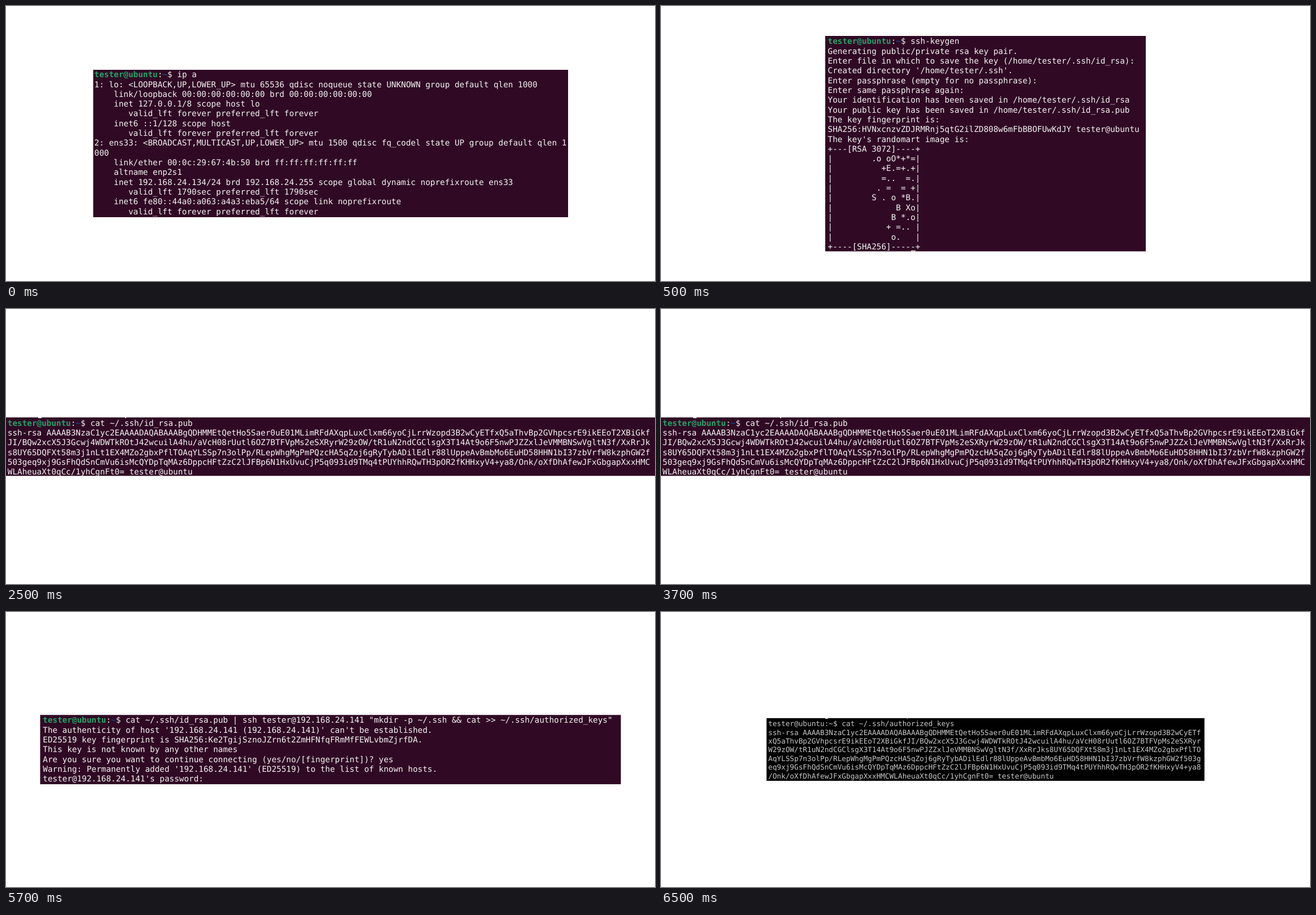
Write an HTML page that moves like this. It is 1150x487 px and loops after 8000 ms.

```html
<!DOCTYPE html>
<html lang="en">
<head>
<meta charset="utf-8">
<title>SSH key setup</title>
<style>
  html, body { margin: 0; width: 100%; height: 100%; overflow: hidden; background: #fff; }
  svg { display: block; width: 1150px; height: 487px; }
  text {
    font-family: "DejaVu Sans Mono", monospace;
    white-space: pre;
    text-rendering: geometricPrecision;
  }
  .user { fill: #26a269; font-weight: bold; }
  .path { fill: #12488b; font-weight: bold; }
</style>
</head>
<body>
<svg id="stage" viewBox="0 0 1150 487"></svg>
<script>
const HOST = 'tester@ubuntu';
const PROMPT = HOST + ':~$ ';
const FOREVER = '       valid_lft forever preferred_lft forever';

const KEY = 'ssh-rsa AAAAB3NzaC1yc2EAAAADAQABAAABgQDHMMEtQetHo5Saer0uE01MLimRFdAXqpLuxClxm66yoCjLrrWzopd3B2wCyETfxQ5aThvBp2GVhpcsrE9ikEEoT2XBiGkf' +
  'JI/BQw2xcX5J3Gcwj4WDWTkROtJ42wcuilA4hu/aVcH08rUutl6OZ7BTFVpMs2eSXRyrW29zOW/tR1uN2ndCGClsgX3T14At9o6F5nwPJZZxlJeVMMBNSwVgltN3f/XxRrJk' +
  's8UY65DQFXt58m3j1nLt1EX4MZo2gbxPflTOAqYLSSp7n3olPp/RLepWhgMgPmPQzcHA5qZoj6gRyTybADilEdlr88lUppeAvBmbMo6EuHD58HHN1bI37zbVrfW8kzphGW2f' +
  '503geq9xj9GsFhQdSnCmVu6isMcQYDpTqMAz6DppcHFtZzC2lJFBp6N1HxUvuCjP5q093id9TMq4tPUYhhRQwTH3pOR2fKHHxyV4+ya8/Onk/oXfDhAfewJFxGbgapXxxHMC' +
  'WLAheuaXt0qCc/1yhCgnFt0= ' + HOST;

const wrap = (text, cols) => text.match(new RegExp(`.{1,${cols}}`, 'g'));

// box: x, y, right, bottom; at: left edge and first baseline; marks: cut-off glyph scraps
const scenes = [
  {
    start: 0, box: [154.5, 113, 996, 374], at: [156.6, 126.2],
    lines: [
      PROMPT + 'ip a',
      '1: lo: <LOOPBACK,UP,LOWER_UP> mtu 65536 qdisc noqueue state UNKNOWN group default qlen 1000',
      '    link/loopback 00:00:00:00:00:00 brd 00:00:00:00:00:00',
      '    inet 127.0.0.1/8 scope host lo',
      FOREVER,
      '    inet6 ::1/128 scope host',
      FOREVER,
      '2: ens33: <BROADCAST,MULTICAST,UP,LOWER_UP> mtu 1500 qdisc fq_codel state UP group default qlen 1',
      '000',
      '    link/ether 00:0c:29:67:4b:50 brd ff:ff:ff:ff:ff:ff',
      '    altname enp2s1',
      '    inet 192.168.24.134/24 brd 192.168.24.255 scope global dynamic noprefixroute ens33',
      '       valid_lft 1790sec preferred_lft 1790sec',
      '    inet6 fe80::44a0:a063:a4a3:eba5/64 scope link noprefixroute',
      FOREVER
    ]
  },
  {
    start: 500, box: [291, 53, 859, 434.5], at: [295.6, 67.4], marks: [[443, 433, 8]],
    lines: [
      PROMPT + 'ssh-keygen',
      'Generating public/private rsa key pair.',
      'Enter file in which to save the key (/home/tester/.ssh/id_rsa):',
      "Created directory '/home/tester/.ssh'.",
      'Enter passphrase (empty for no passphrase):',
      'Enter same passphrase again:',
      'Your identification has been saved in /home/tester/.ssh/id_rsa',
      'Your public key has been saved in /home/tester/.ssh/id_rsa.pub',
      'The key fingerprint is:',
      'SHA256:HVNxcnzvZDJRMRnj5qtG2ilZD808w6mFbBBOFUwKdJY ' + HOST,
      "The key's randomart image is:",
      '+---[RSA 3072]----+',
      '|        .o oO*+*=|',
      '|          +E.=+.+|',
      '|          =..  =.|',
      '|         . =  = +|',
      '|        S . o *B.|',
      '|             B Xo|',
      '|            B *.o|',
      '|           + =.. |',
      '|            o.   |',
      '+----[SHA256]-----+'
    ]
  },
  {
    start: 2500, box: [0, 192, 1150, 295.5], at: [2.8, 206.6], marks: [[57, 192, 6], [211, 192, 2]],
    lines: [PROMPT + 'cat ~/.ssh/id_rsa.pub', ...wrap(KEY, 132)]
  },
  {
    start: 4500, box: [60.5, 182.3, 1089.5, 305], at: [65.3, 196.3],
    lines: [
      PROMPT + 'cat ~/.ssh/id_rsa.pub | ssh tester@192.168.24.141 "mkdir -p ~/.ssh && cat >> ~/.ssh/authorized_keys"',
      "The authenticity of host '192.168.24.141 (192.168.24.141)' can't be established.",
      'ED25519 key fingerprint is SHA256:Ke2TgijSznoJZrn6t2ZmHFNfqFRmMfFEWLvbmZjrfDA.',
      'This key is not known by any other names',
      'Are you sure you want to continue connecting (yes/no/[fingerprint])? yes',
      "Warning: Permanently added '192.168.24.141' (ED25519) to the list of known hosts.",
      "tester@192.168.24.141's password:"
    ]
  },
  {
    start: 6500, box: [187, 188, 963, 299], at: [190, 202.4], marks: [[291, 188, 5], [436, 188, 1]],
    plain: true, size: 12.74, pitch: 15.35, bg: '#000', ink: '#c8c8c8',
    lines: [PROMPT + 'cat ~/.ssh/authorized_keys', ...wrap(KEY, 100)]
  }
];

const escape = s => s.replace(/&/g, '&amp;').replace(/</g, '&lt;').replace(/>/g, '&gt;');

const colorPrompt = s => s.replace(PROMPT,
  `<tspan class="user">${HOST}</tspan>:<tspan class="path">~</tspan>$$ `);

function sceneMarkup({ box: [x, y, r, b], at, lines, marks = [], plain,
                       size = 14.345, pitch = 17.31, bg = '#300a24', ink = '#f6f3f5' }) {
  const rows = lines.map((line, i) => {
    const body = plain ? escape(line) : colorPrompt(escape(line));
    return `<text x="${at[0]}" y="${at[1] + i * pitch}">${body}</text>`;
  });
  const scraps = marks.map(([mx, my, w]) => `<rect x="${mx}" y="${my}" width="${w}" height="1.3"/>`);
  return `<g fill="${ink}" font-size="${size}">
    <rect x="${x}" y="${y}" width="${r - x}" height="${b - y}" fill="${bg}"/>
    ${rows.join('')}${scraps.join('')}</g>`;
}

const stage = document.getElementById('stage');
stage.innerHTML = scenes.map(sceneMarkup).join('');
const groups = [...stage.children];
const origin = performance.now();

function draw(now) {
  const t = Math.max(0, now - origin) % 8000;
  const current = scenes.findLastIndex(s => t >= s.start);
  groups.forEach((g, i) => g.style.display = i === current ? '' : 'none');
  requestAnimationFrame(draw);
}
draw(origin);
</script>
</body>
</html>
```
